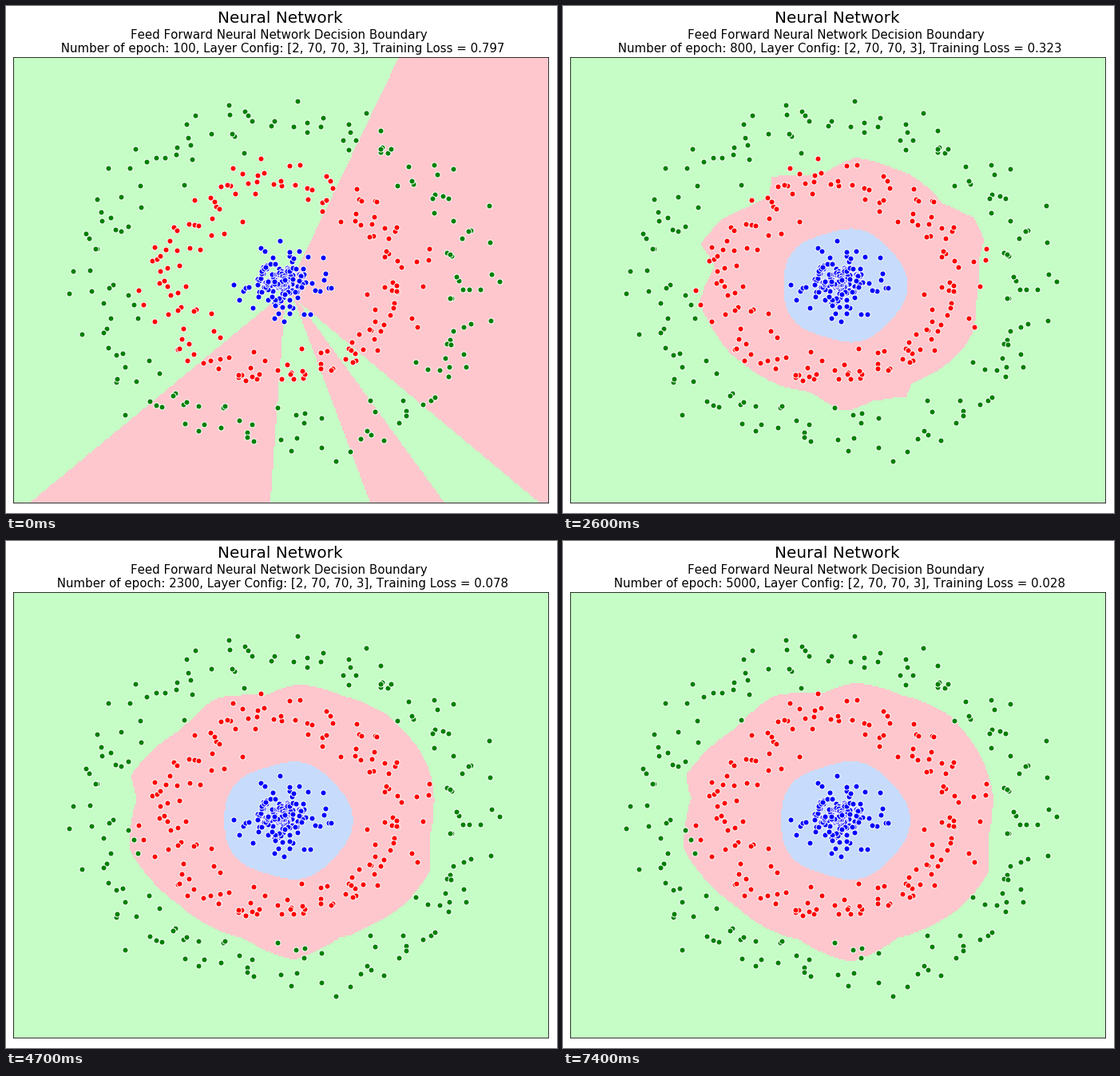
Write a matplotlib script that moves like this. It is 690 px wide and 635 px high and loops after 8900 ms.

```python
import numpy as np
import matplotlib.pyplot as plt
from matplotlib.animation import FuncAnimation
from matplotlib.colors import ListedColormap

plt.rcParams["font.family"] = "DejaVu Sans"
plt.rcParams["text.kerning_factor"] = 6  # whole-pixel kerning

W, H, DPI = 690, 635, 80
PT = 72 / DPI  # points per pixel
LEFT, RIGHT, TOP, BOTTOM = 9, 679, 64, 622
CX, CY = 349, 350
GREEN, PINK, BLUE = 0, 1, 2
rng = np.random.default_rng(7)

# Decision grid with cells of two pixels, in polar form around the centre.
gx, gy = np.meshgrid(np.arange(LEFT + 1, RIGHT, 2), np.arange(TOP + 1, BOTTOM, 2))
cell_r = np.hypot(gx - CX, gy - CY)
cell_angle = np.arctan2(gy - CY, gx - CX)
angles = np.linspace(-np.pi, np.pi, 1440, endpoint=False)


def ring(count, radius, spread):
    """Noisy ring of samples, flattened like the axes."""
    t = np.linspace(0, 2 * np.pi, count) + rng.normal(0, 0.06, count)
    r = radius + spread * np.clip(rng.normal(size=count), -2.2, 2.2)
    return 346 + r * np.cos(t), 344 + r * np.sin(t) * (BOTTOM - TOP) / (RIGHT - LEFT)


def star(base, spikes):
    """Radius of a blob with sharp arms given as (degrees, height, width)."""
    arms = []
    for at, height, width in spikes:
        gap = (np.degrees(angles) - at + 180) % 360 - 180
        arms.append(height * np.exp(-abs(gap) / width))
    return base + np.max(arms, axis=0)


def outline(*corners):
    dx, dy = (np.array(corners) - (CX, CY)).T
    return 1 / np.interp(angles, np.arctan2(dy, dx), 1 / np.hypot(dx, dy),
                         period=2 * np.pi)


def oval(rx, ry):
    edge = rx * ry / np.hypot(ry * np.cos(angles), rx * np.sin(angles))
    return edge + 3 * np.cos(angles) + 2 * np.cos(5 * angles)


# Pink and blue radii early, midway and late in training.
early = np.array([
    star(50, [(-82, 73, 14), (-20, 113, 9), (9, 50, 14), (60, 88, 8),
              (84, 18, 12), (132, 26, 12), (179, 43, 12), (-162, 92, 8)]),
    oval(40, 34)])
midway = np.array([
    outline((364, 206), (425, 228), (447, 268), (508, 268), (521, 295),
            (497, 325), (499, 365), (478, 420), (423, 453), (427, 486),
            (380, 470), (346, 483), (322, 459), (283, 458), (225, 425),
            (210, 385), (197, 365), (228, 331), (196, 305), (220, 277),
            (283, 270), (273, 232), (320, 243)),
    oval(74, 66)])
late = np.array([
    outline((366, 177), (422, 192), (484, 217), (520, 263), (539, 317),
            (533, 372), (534, 415), (500, 458), (420, 497), (362, 528),
            (295, 500), (215, 457), (151, 388), (159, 322), (153, 293),
            (215, 234), (265, 193), (325, 190)),
    oval(81, 73)])

# Untrained net: pink wedges as apex, first and last point on the border.
wedges = [((351, 358), (492, 64), (668, 622)),
          ((357, 358), (549, 622), (456, 622)),
          ((350, 358), (331, 622), (30, 622))]


def wedge_mask(apex, start, end):
    def bearing(x, y):
        return np.arctan2(y - apex[1], x - apex[0])
    a = bearing(gx, gy)
    return (a > bearing(*start)) & (a < bearing(*end))


def edges(epoch):
    if epoch < 500:
        w = np.log(epoch / 200) / np.log(500 / 200)
        return (1 - w) * early + w * midway
    w = 1 - (500 / epoch) ** 1.7
    return (1 - w) * midway + w * late


def regions(epoch):
    grid = np.full(gx.shape, GREEN)
    if epoch < 200:
        for wedge in wedges:
            grid[wedge_mask(*wedge)] = PINK
        return grid
    for edge, kind in zip(edges(epoch), (PINK, BLUE)):
        grid[cell_r < np.interp(cell_angle, angles, edge, period=2 * np.pi)] = kind
    return grid


def title(epoch):
    known = np.array([100, 200, 500, 1100, 2300, 3900, 5000])
    losses = np.array([0.797, 0.692, 0.469, 0.238, 0.078, 0.037, 0.028])
    loss = np.exp(np.interp(epoch ** 0.5, known ** 0.5, np.log(losses)))
    return ("Feed Forward Neural Network Decision Boundary \n "
            f"Number of epoch: {epoch}, Layer Config: [2, 70, 70, 3], "
            f"Training Loss = {loss:.3f}")


# Training speeds up: each epoch stays for fewer ticks of 100 ms.
holds = [8] + [3] * 7 + [2] * 4 + [1] * 37 + [15]
epochs = np.repeat(np.arange(100, 5001, 100), holds)

fig = plt.figure(figsize=(W / DPI, H / DPI), dpi=DPI, facecolor="white")
ax = fig.add_axes([LEFT / W, 1 - BOTTOM / H, (RIGHT - LEFT) / W, (BOTTOM - TOP) / H])
fig.text(343.5 / W, 1 - 21 / H, "Neural Network", fontsize=20 * PT,
         ha="center", va="baseline")
heading = ax.set_title(title(100), fontsize=15 * PT, pad=6 * PT)

area = ax.imshow(regions(100), cmap=ListedColormap(["#c6fcc6", "#fdc7cd", "#c7dcfc"]),
                 vmin=0, vmax=2, extent=(LEFT, RIGHT, BOTTOM, TOP),
                 interpolation="nearest", aspect="auto")

for count, radius, spread, color in ((170, 238, 22, "green"),
                                     (165, 146, 20, "red"),
                                     (200, 0, 28, "blue")):
    ax.scatter(*ring(count, radius, spread), s=50 * PT ** 2, c=color,
               edgecolors="white", linewidths=PT, zorder=2)

ax.set(xlim=(LEFT, RIGHT), ylim=(BOTTOM, TOP), xticks=[], yticks=[])
for spine in ax.spines.values():
    spine.set_linewidth(0.8 * PT)


def draw(tick):
    epoch = int(epochs[tick])
    area.set_data(regions(epoch))
    heading.set_text(title(epoch))
    return area, heading


anim = FuncAnimation(fig, draw, frames=len(epochs), interval=100,
                     repeat=True, repeat_delay=0, blit=False)
plt.show()
```
